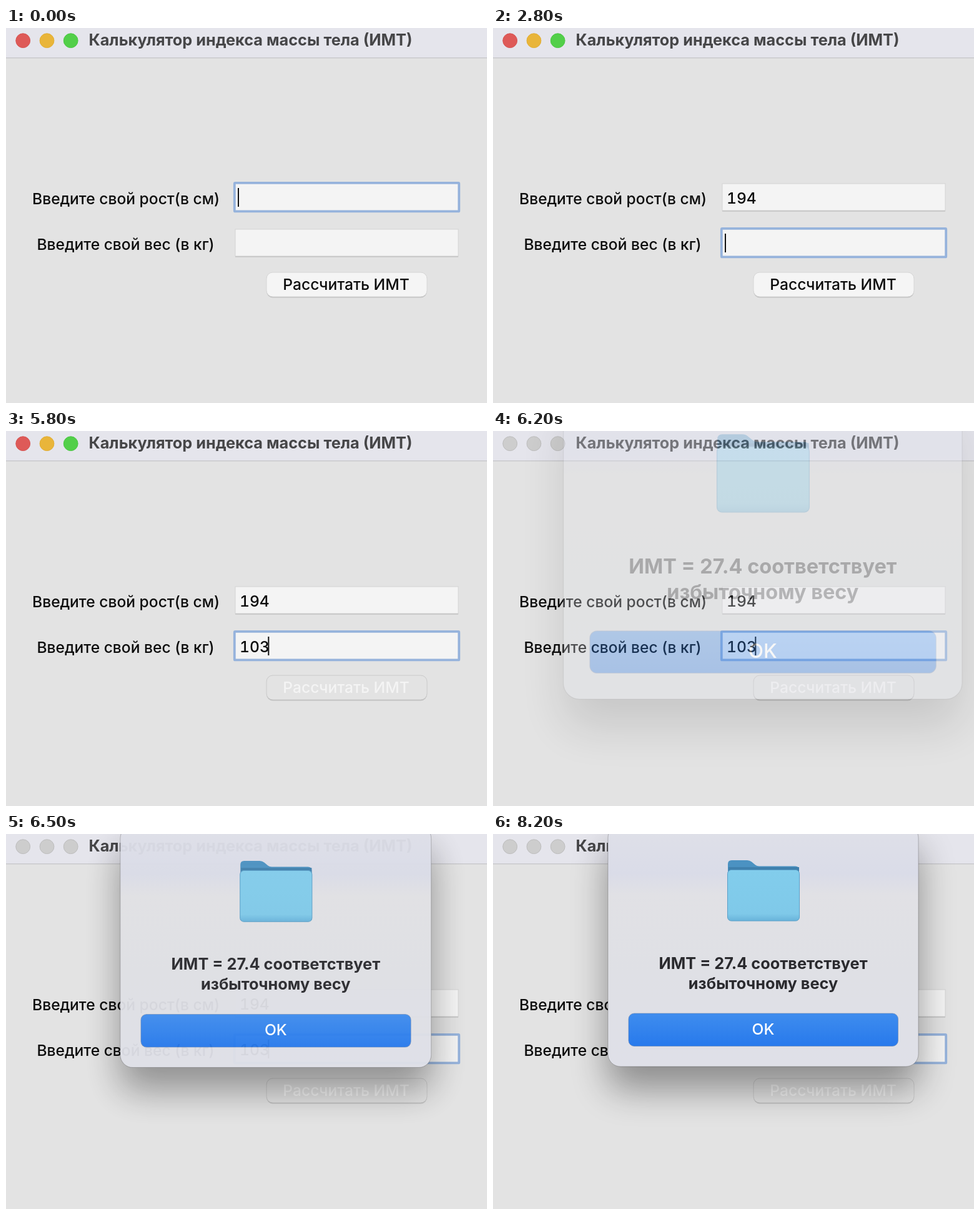
Recreate the animation shown at these times as an HTML page. Size 770 px wide and 600 px high, loop 8900 ms.

```html
<!DOCTYPE html>
<html lang="ru">
<head>
<meta charset="utf-8">
<title>Калькулятор ИМТ</title>
<style>
  html, body { margin: 0; width: 100%; height: 100%; overflow: hidden; background: #e3e3e3; }
  svg { display: block; width: 770px; height: 600px; }
  text { font: 500 24.6px Inter, "Open Sans", sans-serif; fill: #0c0c0c; text-anchor: middle; }
  .bold { font-weight: 700; font-size: 25.3px; fill: #2a2a2e; }
  .num { text-anchor: start; font-variant-numeric: tabular-nums; }
</style>
</head>
<body>
<svg viewBox="0 0 770 600" xmlns="http://www.w3.org/2000/svg">
  <defs>
    <linearGradient id="sheet" x1="0" y1="0" x2="0" y2="1">
      <stop offset="0" stop-color="#dfe0e8"/>
      <stop offset=".2" stop-color="#dadce8"/>
      <stop offset=".29" stop-color="#e1e1e5"/>
      <stop offset=".6" stop-color="#dfe0e5"/>
      <stop offset="1" stop-color="#dfe0e8"/>
    </linearGradient>
    <linearGradient id="blue" x1="0" y1="0" x2="0" y2="1">
      <stop offset="0" stop-color="#3f8dee"/>
      <stop offset="1" stop-color="#2779ec"/>
    </linearGradient>
    <linearGradient id="front" x1="0" y1="0" x2="0" y2="1">
      <stop offset="0" stop-color="#82cdec"/>
      <stop offset=".86" stop-color="#7fc9e9"/>
      <stop offset="1" stop-color="#68b3da"/>
    </linearGradient>
    <filter id="blur" filterUnits="userSpaceOnUse" x="60" y="-110" width="746" height="650">
      <feGaussianBlur stdDeviation="29"/>
    </filter>
  </defs>

  <rect width="770" height="600" fill="#e3e3e3"/>
  <rect width="770" height="48" fill="#e5e5ec"/>
  <rect y="47" width="770" height="1.5" fill="#c9c9cd"/>
  <g id="lights" stroke-width="1">
    <circle cx="27.2" cy="20.2" r="11.4"/>
    <circle cx="65.5" cy="20.2" r="11.4"/>
    <circle cx="103.7" cy="20.2" r="11.4"/>
  </g>
  <text class="bold" x="391.5" y="28" style="fill:#464648">Калькулятор индекса массы тела (ИМТ)</text>

  <text x="192" y="282">Введите свой рост(в см)</text>
  <text x="191.5" y="355">Введите свой вес (в кг)</text>
  <g id="fields"></g>

  <g id="calc">
    <rect x="417" y="392" width="257" height="39.5" rx="10" fill="#bcbcbc"/>
    <rect id="face" x="417" y="391" width="257" height="39" rx="10" stroke="#d2d2d2"/>
    <text id="calcText" x="544.5" y="418.5">Рассчитать ИМТ</text>
  </g>

  <g id="alert">
    <rect x="184" y="22" width="497" height="386" rx="20" opacity=".38" filter="url(#blur)"/>
    <rect x="184" y="-14" width="497" height="386" rx="20" fill="url(#sheet)" stroke="#000" stroke-opacity=".22"/>
    <path d="M376 130V48q0-6 6-6h25q4 0 7 2.5l6 5q2.500 2 6 2h58q6 0 6 6v70z" fill="#4b92c2"/>
    <rect x="377" y="53" width="113" height="8" fill="#3f80ad"/>
    <rect x="375.5" y="57.5" width="115" height="81.5" rx="6" fill="url(#front)" stroke="#5b9fc8"/>
    <text class="bold" x="432.5" y="215.6">ИМТ = 27.4 соответствует</text>
    <text class="bold" x="432.5" y="247.6">избыточному весу</text>
    <rect x="217" y="287" width="431.5" height="52.5" rx="9" fill="url(#blue)" stroke="#6a84ad" stroke-opacity=".6"/>
    <text x="432.5" y="320.5" style="fill:#fff">OK</text>
  </g>
</svg>
<script>
  const LOOP = 8900, STEP = 100;
  const CENTER = { x: 432.5, y: 176 };
  const $ = id => document.getElementById(id);
  const set = (el, attrs) => { for (const k in attrs) el.setAttribute(k, attrs[k]); };

  function make(tag, attrs, parent) {
    const el = document.createElementNS("http://www.w3.org/2000/svg", tag);
    set(el, attrs);
    return parent.appendChild(el);
  }

  function makeField(y) {
    const g = make("g", {}, $("fields"));
    make("rect", { x: 367, y: y + 1, width: 357, height: 43.5, fill: "#b9b9b9" }, g);
    make("rect", { x: 367, y, width: 357, height: 43, fill: "#f4f4f4", stroke: "#d4d4d4" }, g);
    const ring = make("rect", { x: 365.8, y: y - 1.2, width: 359.4, height: 45.6, rx: 1,
      fill: "#f4f4f4", stroke: "#96b3dc", "stroke-width": 3.8 }, g);
    const text = make("text", { class: "num", x: 374, y: y + 31.5 }, g);
    const caret = make("rect", { y: y + 7, width: 2, height: 30, fill: "#111" }, g);
    return (value, focused, caretOn) => {
      text.textContent = value;
      set(ring, { visibility: focused ? "visible" : "hidden" });
      set(caret, { x: 371 + 16.1 * value.length, visibility: focused && caretOn ? "visible" : "hidden" });
    };
  }

  const height = makeField(249), weight = makeField(322);
  const typed = (word, times, t) => word.slice(0, times.filter(at => t >= at).length);
  const within = (t, a, b) => t >= a && t < b;
  const BLINKS = [[1300, 1500], [2300, 2800], [3600, 4100], [5000, 5400]];

  function drawLights(active) {
    const fills = ["#de5a58", "#e9b53a", "#52cf49"], edges = ["#d75553", "#e2ae34", "#4bc743"];
    [...$("lights").children].forEach((c, i) =>
      set(c, { fill: active ? fills[i] : "#cdcdcd", stroke: active ? edges[i] : "#bdbdbd" }));
  }

  function drawAlert(t) {
    const shown = t >= 6000;
    set($("alert"), { visibility: shown ? "visible" : "hidden" });
    if (!shown) return;
    const u = Math.min(1, (t - 6000) / 520);
    const rest = (1 + Math.cos(Math.PI * u)) / 2;
    const scale = 1 + 0.42 * rest;
    const dx = u < 1 ? -0.7 : 0, dy = u < 1 ? 1.3 : 0;
    set($("alert"), {
      opacity: (t < 7400 ? 0.96 : 1) * (1 - rest),
      transform: `translate(${CENTER.x + dx} ${CENTER.y + dy}) scale(${scale}) translate(${-CENTER.x} ${-CENTER.y})`
    });
  }

  function draw(t) {
    const caretOn = !BLINKS.some(([a, b]) => within(t, a, b));
    const second = t >= 2800, pressed = t >= 5800;
    height(typed("194", [800, 1500, 1700], t), !second, caretOn);
    weight(typed("103", [3200, 4300, 4500], t), second, caretOn);
    set($("face"), { fill: pressed ? "#e3e3e3" : "#f5f5f5", stroke: pressed ? "#cacaca" : "#d6d6d6" });
    $("calcText").style.fill = pressed ? "#f4f4f4" : "#0c0c0c";
    drawLights(t < 6000);
    drawAlert(t);
  }

  const start = performance.now();
  function tick() {
    const t = (performance.now() - start) % LOOP;
    draw(Math.floor(t / STEP) * STEP);
    requestAnimationFrame(tick);
  }
  tick();
</script>
</body>
</html>
```
